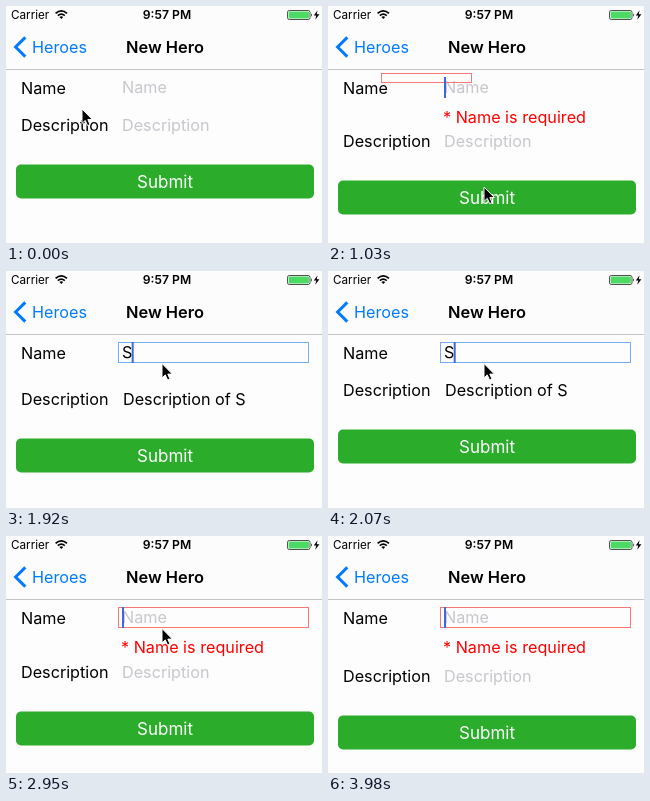
An HTML page that plays this animation: 316x237 px, repeating every 4.18 s.

```html
<!DOCTYPE html>
<html lang="en">
<head>
<meta charset="utf-8">
<title>New Hero form</title>
<style>
  html, body { margin: 0; width: 100%; height: 100%; overflow: hidden; background: #fdfdfd; }
  svg { display: block; width: 316px; height: 237px; }
  text { font: 16.2px Inter, "Liberation Sans", sans-serif; white-space: pre; }
  .status { font-size: 11.7px; }
  .strong { font-weight: 600; }
  .title { font-size: 16.4px; }
  .button { font-size: 17px; }
  .hint { fill: #c7c7cd; }
</style>
</head>
<body>
<svg viewBox="0 0 316 237">
  <rect width="316" height="237" fill="#fdfdfd"/>
  <rect width="316" height="63" fill="#fcfcfc"/>
  <rect y="63" width="316" height="1" fill="#c4c4c6"/>

  <text class="status" x="5" y="13.4">Carrier</text>
  <g fill="none" stroke="#000" stroke-width="1.7">
    <path d="M49.6 7.3Q55.3 2.4 61 7.3M51.8 9.6Q55.3 6.7 58.8 9.6"/>
    <path d="M53.4 10.9Q55.3 9.5 57.2 10.9L55.3 13Z" fill="#000" stroke="none"/>
  </g>
  <text class="status strong" x="161" y="13.4" text-anchor="middle" style="font-size:12.2px">9:57 PM</text>
  <rect x="281.5" y="4.5" width="22.5" height="9" rx="1.8" fill="#fff" stroke="#222" stroke-width=".8"/>
  <rect x="282.6" y="5.6" width="20.3" height="6.8" rx=".8" fill="#4cd964"/>
  <path d="M305.2 7.2q1.6 1.8 0 3.6z"/>
  <path d="M311.6 4.2L307.8 9.6h2.5L309.2 13.8L313.4 8.2h-2.7z"/>

  <path d="M19.3 31.4L9.6 41L19.3 50.6" fill="none" stroke="#007aff" stroke-width="3"/>
  <text x="26" y="47" fill="#007aff">Heroes</text>
  <text class="strong title" x="159" y="47" text-anchor="middle">New Hero</text>

  <text x="15" y="87.5">Name</text>
  <text id="name" x="116" y="87.3"></text>
  <text id="error" x="115" y="116.8" fill="#f00">* Name is required</text>
  <g id="lower">
    <text x="15" y="124.7">Description</text>
    <text id="description" y="124.7"></text>
    <rect x="10" y="158.5" width="298" height="34" rx="5" fill="#2bad2b"/>
    <text class="button" x="159" y="182" text-anchor="middle" fill="#fff">Submit</text>
  </g>
  <rect id="border" fill="none"/>
  <rect id="caret" y="71" width="2" height="21" fill="#3f68e0"/>
  <path id="cursor" d="M0 0V14.4L3.3 11.4L5.6 16.6L8 15.6L5.8 10.6H10.4Z" stroke="#fff"/>
</svg>
<script>
  const LOOP = 4180;
  const CAPTURE_STEP = 147.4; // the screen refreshes only this often
  const SLIDE = 240;
  const ERROR_HEIGHT = 21;
  const CURSOR_HIDES = 3600;

  // "at" swaps the content, "slide" starts the layout change and the caret blink.
  const phases = [
    { at: 0, name: 'empty' },
    { at: 991, slide: 868, name: 'invalid' },
    { at: 1760, slide: 1785, name: 'typed' },
    { at: 2790, slide: 2772, name: 'invalid' }
  ];
  const moves = [
    { at: 0, delay: 95, duration: 380, from: [76, 103], via: [127, 120], to: [156, 181] },
    { at: 1121, delay: 0, duration: 277, from: [156, 181], via: [156, 137], to: [156, 92.5] },
    { at: 3250, delay: 0, duration: 260, from: [156, 92.5], via: [261, 118], to: [293.5, 210] }
  ];

  const el = id => document.getElementById(id);
  const set = (id, attrs) => {
    for (const key in attrs) el(id).setAttribute(key, attrs[key]);
  };
  const clamp = p => Math.min(1, Math.max(0, p));
  const ease = p => { p = clamp(p); return p * p * (3 - 2 * p); };
  const current = (list, time) => list.findLast(item => item.at <= time);

  function layoutShift(time) {
    const [opened, closed, reopened] = phases.slice(1).map(p => ease((time - p.slide) / SLIDE));
    return Math.round(ERROR_HEIGHT * (opened - closed + reopened));
  }

  function caretOpacity(age) {
    const fadeOut = clamp((age - 550) / 200);
    const fadeIn = clamp((age - 980) / 150);
    return 1 - fadeOut + fadeIn;
  }

  function cursorTip(time) {
    const { at, delay, duration, from, via, to } = current(moves, time);
    const u = ease((time - at - delay) / duration);
    return from.map((a, i) => (1 - u) ** 2 * a + 2 * u * (1 - u) * via[i] + u * u * to[i]);
  }

  function render(elapsed) {
    const time = Math.floor((elapsed + 10) / CAPTURE_STEP) * CAPTURE_STEP;
    const phase = current(phases, time);
    const empty = phase.name === 'empty';
    const typed = phase.name === 'typed';
    const growth = 1 - Math.exp(-Math.max(0, time - phases[1].at) / 64);

    el('name').textContent = typed ? 'S' : 'Name';
    el('description').textContent = typed ? 'Description of S' : 'Description';
    set('name', { class: typed ? '' : 'hint' });
    set('description', { class: typed ? '' : 'hint', x: typed ? 117 : 116 });
    set('error', { visibility: phase.name === 'invalid' ? 'visible' : 'hidden' });
    set('lower', { transform: `translate(0 ${layoutShift(time)})` });
    set('border', {
      visibility: empty ? 'hidden' : 'visible',
      stroke: typed ? '#72aef0' : '#f87878',
      x: Math.round(112 * growth) + .5,
      y: Math.round(63 + 8 * growth) + .5,
      width: Math.round(190 * growth),
      height: Math.round(20 * growth)
    });
    set('caret', { x: typed ? 125.7 : 116, opacity: empty ? 0 : caretOpacity(time - phase.slide) });
    set('cursor', {
      visibility: time < CURSOR_HIDES ? 'visible' : 'hidden',
      transform: `translate(${cursorTip(time)})`
    });
  }

  const start = performance.now();
  function tick() {
    render((performance.now() - start) % LOOP);
    requestAnimationFrame(tick);
  }
  tick();
</script>
</body>
</html>
```
